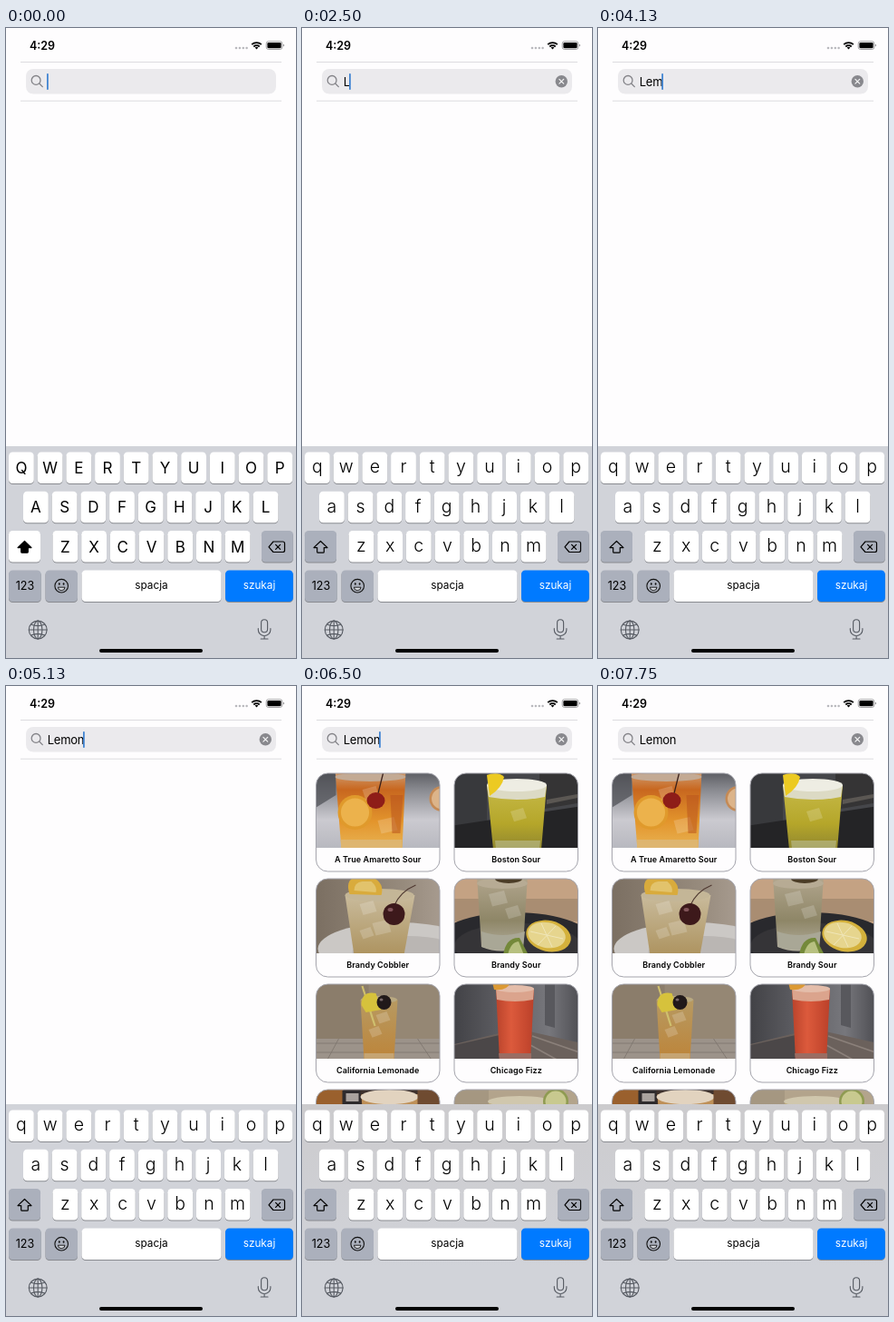
These frames come from a looping animation (320x693 px, 8000 ms). An HTML page:

```html
<!DOCTYPE html>
<html lang="pl">
<head>
<meta charset="utf-8">
<title>Search</title>
<style>
html, body { margin: 0; width: 100%; height: 100%; overflow: hidden; background: #fefdfe; }
svg { display: block; width: 320px; height: 693px; font-family: Inter, "Liberation Sans", sans-serif; }
.line { fill: none; stroke-linecap: round; stroke-linejoin: round; }
</style>
</head>
<body>
<svg id="stage" viewBox="0 0 320 693">
  <defs>
    <clipPath id="photo"><path d="M0 82V13A13 13 0 0 1 13 0H123.500A13 13 0 0 1 136.500 13V82Z"/></clipPath>
    <filter id="soft"><feGaussianBlur stdDeviation=".7"/></filter>
    <linearGradient id="amber" x2="0" y2="1"><stop stop-color="#d0a47c"/><stop offset=".25" stop-color="#c8671f"/><stop offset=".65" stop-color="#e3952c"/><stop offset="1" stop-color="#e8b455"/></linearGradient>
    <linearGradient id="olive" x2="0" y2="1"><stop stop-color="#c6ba48"/><stop offset=".6" stop-color="#b5a62a"/><stop offset="1" stop-color="#8f8630"/></linearGradient>
    <linearGradient id="cream" x2="0" y2="1"><stop stop-color="#c9bb9c"/><stop offset="1" stop-color="#ad935f"/></linearGradient>
    <linearGradient id="smoke" x2="0" y2="1"><stop stop-color="#b3a78f"/><stop offset=".6" stop-color="#8e8667"/><stop offset="1" stop-color="#b5b0a0"/></linearGradient>
    <linearGradient id="gold" x2="0" y2="1"><stop stop-color="#b79a62"/><stop offset="1" stop-color="#bd8439"/></linearGradient>
    <linearGradient id="coral" x2="1"><stop stop-color="#b9432b"/><stop offset=".4" stop-color="#dc5a3c"/><stop offset="1" stop-color="#bb4029"/></linearGradient>
    <linearGradient id="marble" x2="0" y2="1"><stop stop-color="#56575c"/><stop offset=".25" stop-color="#8b8c92"/><stop offset=".6" stop-color="#cbcad0"/><stop offset="1" stop-color="#b4b5bc"/></linearGradient>
    <linearGradient id="night" x2="1"><stop stop-color="#404044"/><stop offset=".35" stop-color="#5b5b60"/><stop offset=".75" stop-color="#77777c"/><stop offset="1" stop-color="#4b4b50"/></linearGradient>
    <linearGradient id="wall" x2="1"><stop stop-color="#7a6e61"/><stop offset=".7" stop-color="#978b7d"/><stop offset="1" stop-color="#a89c90"/></linearGradient>
    <linearGradient id="tint" x2="0" y2="1"><stop stop-color="#a8947e" stop-opacity=".13"/><stop offset="1" stop-color="#a8947e" stop-opacity="0"/></linearGradient>
  </defs>
  <rect width="320" height="693" fill="#fefdfe"/>

  <text x="26" y="23.500" font-size="12.500" font-weight="600">4:29</text>
  <g fill="#b9b9bd"><circle cx="254" cy="22" r="1.300"/><circle cx="257.900" cy="22" r="1.300"/><circle cx="261.800" cy="22" r="1.300"/><circle cx="265.600" cy="22" r="1.300"/></g>
  <g class="line" stroke="#000" stroke-width="1.900" style="stroke-linecap:butt">
    <path d="M271.200 18.100A8 8 0 0 1 281.800 18.100M273.300 20.500A4.800 4.800 0 0 1 279.700 20.500"/>
    <path d="M276.500 23.500l-1.800-1.900a2.700 2.700 0 0 1 3.600 0z" fill="#000" stroke="none"/>
  </g>
  <rect x="287.200" y="14.700" width="17.600" height="8.800" rx="2.400" fill="none" stroke="#8c8c8e" stroke-width=".8"/>
  <rect x="288.400" y="15.900" width="15.200" height="6.400" rx="1.400"/>
  <path d="M305.800 17.700q1.300 .4 1.300 1.400t-1.300 1.400z" fill="#8c8c8e"/>

  <path d="M16 37.500H304M16 80.200H304" stroke="#dcdcdf"/>
  <rect x="22" y="45" width="276" height="27.500" rx="8" fill="#ebeaed"/>
  <path class="line" d="M38 57.400a4.900 4.900 0 1 1-9.800 0a4.900 4.900 0 1 1 9.800 0M36.700 61l3.600 3.600" stroke="#838388" stroke-width="1.300"/>
  <text id="query" x="45.800" y="63.500" font-size="13" letter-spacing="-.3"></text>
  <rect id="caret" y="50" width="1.800" height="18" rx=".8" fill="#4285d2"/>
  <g id="clear">
    <circle cx="286.300" cy="58.800" r="6.700" fill="#88888d"/>
    <path class="line" d="M283.900 56.400l4.800 4.800m0-4.800l-4.800 4.800" stroke="#f4f4f5" stroke-width="1.200"/>
  </g>

  <g id="cards"></g>
  <rect y="460" width="320" height="233" fill="#d1d3d9"/>
  <rect id="glow" y="460" width="320" height="180" fill="url(#tint)"/>
  <g id="keys"></g>
  <g id="shiftOn"></g>
  <g id="shiftOff"></g>
  <g id="upper"></g>
  <g id="lower" font-weight="300"></g>

  <path class="line" d="M294.900 565H305.500a2 2 0 0 1 2 2V574.500a2 2 0 0 1-2 2H294.900L290 570.800zM297.600 568.300l5 5m0-5l-5 5" stroke="#000" stroke-width="1.200"/>
  <g text-anchor="middle" font-size="11.800">
    <text x="21" y="618.200" font-size="12.600">123</text>
    <text x="160.500" y="617">spacja</text>
    <text x="279.500" y="617" fill="#fff">szukaj</text>
  </g>
  <circle cx="61.200" cy="613.700" r="7.300" fill="none" stroke="#111" stroke-width="1.100"/>
  <g fill="#111"><ellipse cx="58.800" cy="611.500" rx=".9" ry="1.300"/><ellipse cx="63.600" cy="611.500" rx=".9" ry="1.300"/></g>
  <path d="M57.400 615.200H65A3.800 3.500 0 0 1 57.400 615.200Z" fill="#d5d8de" stroke="#111" stroke-width=".9"/>
  <g class="line" stroke="#565a62" stroke-width="1.100">
    <circle cx="35.200" cy="662" r="9.900"/><ellipse cx="35.200" cy="662" rx="4.700" ry="9.900"/>
    <path d="M35.200 652.100v19.800M25.300 662h19.800M27.600 656q7.600 3.200 15.200 0M27.600 668q7.600-3.200 15.200 0"/>
    <rect x="281.600" y="650.800" width="7" height="14" rx="3.500"/>
    <path d="M278.300 660.500v1.400a6.800 6.800 0 0 0 13.600 0v-1.400M285.100 668.700v3.300M281.200 672h7.800"/>
  </g>
  <rect x="103" y="683" width="114" height="4" rx="2"/>
</svg>
<script>
const $ = id => document.getElementById(id);
const LOOP = 8000, CARDS_AT = 6250, PHOTOS_AT = 6500;

// [typed at, text, caret x, blink phase start]
const STEPS = [
  [0, '', 45, 0],
  [2500, 'L', 52, 2380],
  [3380, 'Le', 59.500, 3260],
  [4130, 'Lem', 70.200, 4130],
  [4380, 'Lemo', 77.700, 4380],
  [5130, 'Lemon', 85, 5130]
];

const box = (x, y, w, h, fill) => `<rect x="${x}" y="${y}" width="${w}" height="${h}" fill="${fill}"/>`;
const back = fill => box(-4, -4, 145, 92, fill);
const oval = (x, y, rx, ry, fill, more = '') => `<ellipse cx="${x}" cy="${y}" rx="${rx}" ry="${ry}" fill="${fill}" ${more}/>`;
const poly = (d, fill, more = '') => `<path d="${d}" fill="${fill}" ${more}/>`;
const stroke = (d, color, width) => poly(d, 'none', `stroke="${color}" stroke-width="${width}"`);
const slice = (x, y, r, rind, flesh) => oval(x, y, r, r, rind) + oval(x, y, r * .82, r * .82, flesh);
const ice = (x, y, s) => poly(`M${x} ${y}l${s} -4l4 ${s * .8}l-${s} 4z`, '#fff', 'opacity=".18"');

const PHOTOS = [
  back('url(#marble)') + poly('M-4-4H22V24L-4 40Z', '#4c4e53', 'opacity=".7"') +
    slice(139, 28, 14, '#c58a55', '#dcb48a') +
    poly('M21-4H99L95 84H28Z', 'url(#amber)') + oval(60, 4, 39, 5, '#c3aa94') +
    slice(43, 43, 19, '#e09a2c', '#ecb24c') + ice(68, 52, 18) + ice(51, 18, 15) +
    poly('M82 24H96L93 66H84Z', '#b9531d', 'opacity=".55"') +
    stroke('M74 0L68 24', '#3b211a', 1.300) + oval(66, 30, 10, 9, '#8e1d18') +
    poly('M27 73H95L94 84H28Z', '#dcb878', 'opacity=".8"'),

  back('#45464a') + poly('M-4-4H36V84H-4Z', '#38393c') + poly('M94-4H141V32L94 40Z', '#353435') +
    poly('M-4 58L141 36V86H-4Z', '#242426') + poly('M102 29L141 22V26L102 34Z', '#5b5753') +
    poly('M36 13H102L96 84H43Z', 'url(#olive)') + poly('M36 13H102L100 26Q69 32 38 26Z', '#dcdac4') +
    oval(69, 13, 33, 7, '#eeede3') + poly('M36 2Q48-3 55 4Q53 16 39 25Z', '#ecca22') +
    ice(62, 42, 14) + poly('M45 74H95L94 84H46Z', '#b8ba8c', 'opacity=".65"'),

  back('url(#wall)') +
    oval(90, 77, 88, 29, '#cbc8c5') + oval(100, 81, 60, 18, '#bab6b3') +
    poly('M32 18H109L97 84H42Z', 'url(#cream)') + oval(70, 18, 38, 7, '#c4b697') +
    poly('M37 17Q32 2 43-2H62Q76 5 72 18Z', '#d9ab3c') + poly('M42 13Q42 4 51 3H61Q68 9 66 15Z', '#e2c36c') +
    ice(48, 28, 15) + ice(62, 49, 17) + ice(48, 57, 12) +
    stroke('M86 30Q93 14 110 7', '#503a32', 1.300) + oval(86, 39, 12, 12, '#3d191b') + oval(82, 34, 3, 2, '#82555a'),

  back('#c4a283') + box(-4, 22, 145, 25, '#a98d72') +
    oval(67, 71, 89, 34, '#29292d') + oval(70, 74, 70, 25, '#353437') +
    poly('M25-4H81L76 75Q52 84 30 75Z', 'url(#smoke)') + oval(53, 5, 28, 6, '#b7ab94') +
    oval(60, 0, 15, 5, '#4b3c26') + ice(38, 17, 17) + ice(56, 33, 14) +
    poly('M30 58Q53 66 78 58L76 75Q52 82 31 75Z', '#a9a796') +
    oval(104, 63, 25, 17, '#d4b13c', 'transform="rotate(12 104 63)"') + oval(102, 62, 21, 14, '#e6d58e', 'transform="rotate(12 102 62)"') +
    stroke('M84 58L120 66M96 49L108 75M112 52L92 73', '#f0e6b8', 1) +
    poly('M54 84Q57 64 72 65L82 84Z', '#74893a') + poly('M59 84Q62 70 71 69L77 84Z', '#b7c080'),

  back('#958774') + poly('M-4-4H58V60H-4Z', '#8b7d6b') + box(-4, 60, 145, 28, '#9c938a') +
    stroke('M-4 65H141M-4 75H141M25 60L12 84M112 60L128 84', '#7d746d', .8) +
    poly('M49 17H90L86 84H53Z', 'url(#gold)') + oval(69.500, 17, 20, 4, '#b9a981') +
    stroke('M51 2L65 46', '#cfc06e', 2.200) +
    poly('M50 23Q50 7 66 10L72 28L55 31Z', '#d6c23c') + ice(66, 34, 12) + ice(58, 50, 11) +
    oval(75, 20, 8, 8, '#21191a') + oval(72, 17, 2, 1.500, '#77686a') + poly('M53 76H86V84H53Z', '#c5a473'),

  back('url(#night)') + poly('M100-4H111V48L100 45Z', '#58585d') +
    poly('M-4 67L70 49L141 65V86H-4Z', '#6b615c') + poly('M-4 68L50 56L82 86H-4Z', '#4b4748') +
    stroke('M86 57L141 76M84 67L115 84', '#8b807a', 1.500) +
    poly('M46 5H88L84 84H50Z', 'url(#coral)') + poly('M46 5H88L87 17Q67 21 47 17Z', '#dba48d') +
    oval(67, 5, 21, 4, '#e4bdaa') + poly('M42-2H62Q58 8 44 6Z', '#dc9a34') + poly('M49 76H85V84H50Z', '#9a6c62'),

  back('#3d302b') + poly('M-4-4H29L35 24H-4Z', '#9a602d') + box(29, 1, 20, 20, '#2e2b2d') +
    box(33, 4, 14, 9, '#a9a29e') + poly('M50 5H113L109 84H55Z', '#be9058') + oval(81, 8, 32, 8, '#e2d3bf') +
    poly('M112-4H141V24H112Z', '#6f4b31'),

  back('#b3a48c') + box(-4, -4, 42, 90, '#a59781') + poly('M38 12H107L102 84H43Z', '#bcac7c') +
    oval(72, 13, 35, 6, '#d0c7ad') + slice(112, 13, 14, '#8f9b52', '#c8c98f')
];
const NAMES = ['A True Amaretto Sour', 'Boston Sour', 'Brandy Cobbler', 'Brandy Sour', 'California Lemonade', 'Chicago Fizz', '', ''];

$('cards').innerHTML = NAMES.map((name, i) => {
  const x = i % 2 ? 168 : 15.500, y = 96 + 116 * (i >> 1);
  return `<g transform="translate(${x} ${y})">
    <g class="photo" clip-path="url(#photo)"><g filter="url(#soft)">${PHOTOS[i]}</g></g>
    <rect width="136.500" height="108" rx="13" fill="none" stroke="#a4a4ac"/>
    <text x="68.250" y="98.400" font-size="9" font-weight="600" letter-spacing=".08" text-anchor="middle">${name}</text></g>`;
}).join('');

const key = (x, y, w, fill = '#fff') =>
  `<rect x="${x}" y="${y + 1}" width="${w}" height="34.500" rx="4.300" fill="#898b90"/>
   <rect x="${x}" y="${y}" width="${w}" height="34.500" rx="4.300" fill="${fill}"/>`;
const GREY = '#abb0bc';
const ROWS = [['qwertyuiop', 3, 466.500], ['asdfghjkl', 19, 509.800], ['zxcvbnm', 51.500, 553]];
const caps = ROWS.flatMap(([row, x, y]) => [...row].map((c, i) => ({ c, x: x + 31.700 * i, y })));
const letters = (size, dy, change) => caps.map(({ c, x, y }) =>
  `<text x="${x + 13.900}" y="${y + dy}" font-size="${size}" text-anchor="middle">${change(c)}</text>`).join('');

$('keys').innerHTML = caps.map(k => key(k.x, k.y, 27.800)).join('') +
  key(282, 553, 34.800, GREY) + key(3, 596.500, 35.700, GREY) + key(43.500, 596.500, 35.500, GREY) +
  key(83.500, 596.500, 154, '#fff') + key(242, 596.500, 74.800, '#007aff');
$('upper').innerHTML = letters(17, 23.600, c => c.toUpperCase());
$('lower').innerHTML = letters(19.500, 22.800, c => c);

const arrow = fill => `<path class="line" d="M20.500 564.500L28 571.600H24.300V576.200Q24.300 577.200 23.300 577.200H17.700Q16.700 577.200 16.700 576.200V571.600H13Z" style="fill:${fill}" stroke="#000" stroke-width="1.200"/>`;
$('shiftOn').innerHTML = key(3, 553, 35) + arrow('#000');
$('shiftOff').innerHTML = key(3, 553, 35, GREY) + arrow('none');

const photos = document.querySelectorAll('.photo');
const show = (el, on) => el.setAttribute('visibility', on ? 'visible' : 'hidden');

function caretAlpha(phase) {
  if (phase < 500) return 1;
  return phase >= 620 && phase < 870 ? 0 : .5;
}

function draw() {
  const t = performance.now() % LOOP;
  const [, text, x, blink] = STEPS.filter(s => s[0] <= t).pop();
  const typed = text !== '';
  $('query').textContent = text;
  $('caret').setAttribute('x', x);
  $('caret').setAttribute('opacity', caretAlpha((t - blink) % 1000));
  for (const id of ['clear', 'lower', 'shiftOff']) show($(id), typed);
  for (const id of ['upper', 'shiftOn']) show($(id), !typed);
  show($('cards'), t >= CARDS_AT);
  show($('glow'), t >= PHOTOS_AT);
  photos.forEach(p => show(p, t >= PHOTOS_AT));
  requestAnimationFrame(draw);
}
draw();
</script>
</body>
</html>
```
